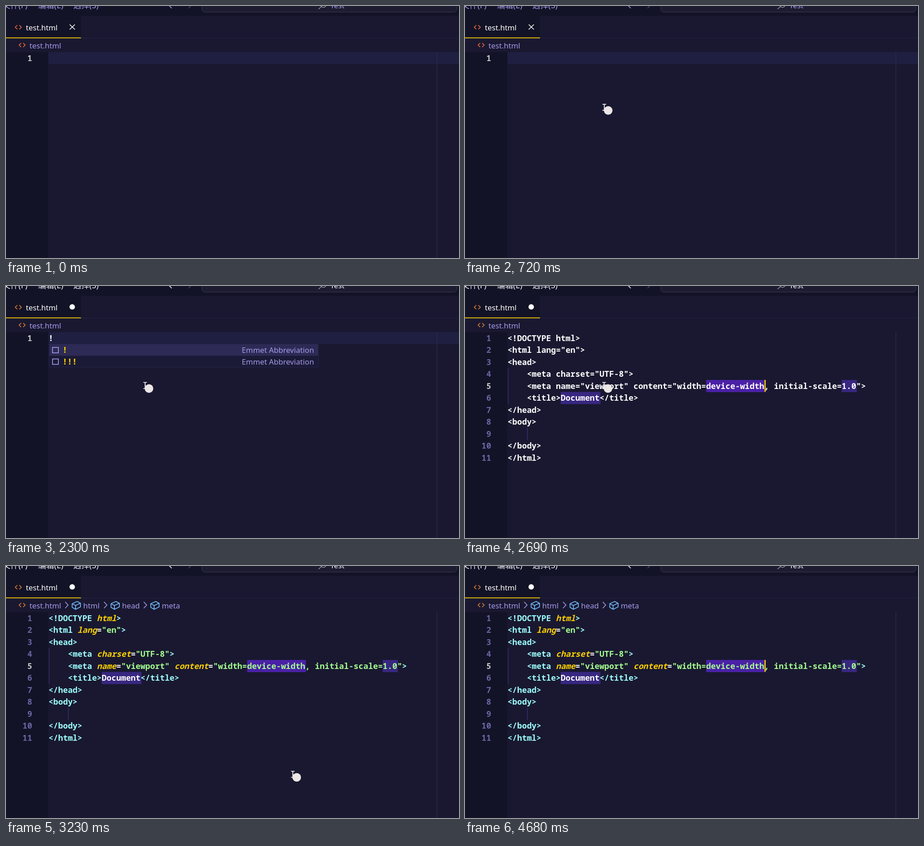
Recreate the animation shown at these times as an HTML page. Size 1003 px wide and 558 px high, loop 5.15 s.

```html
<!DOCTYPE html>
<html lang="en">
<head>
<meta charset="UTF-8">
<title>Editor</title>
<style>
html, body { margin: 0; width: 100%; height: 100%; overflow: hidden; background: #191830; }
svg { display: block; width: 1003px; height: 558px; }
text { white-space: pre; }
.ui { font: 16.7px "Noto Sans", "Noto Sans CJK SC", sans-serif; fill: #a599e9; }
.menu { font-size: 17.8px; }
.code { font: bold 17.89px "Noto Sans Mono", monospace; fill: #fff; }
.num { text-anchor: end; fill: #6c64a4; }
.num.now { fill: #c6c6c6; }
.line { fill: none; stroke-width: 1.7; }
.colored .tag { fill: #9effff; }
.colored .attr { fill: #fad000; font-style: italic; }
.colored .str { fill: #a5ff90; }
#top { fill: #a599e9; stroke: #a599e9; }
#top text { fill: inherit; stroke: none; }
#top.focus { fill: #f4f4fa; stroke: #f4f4fa; }
</style>
</head>
<body>
<svg viewBox="0 0 1003 558">
  <rect width="1003" height="558" fill="#191830"/>
  <rect width="1003" height="22" fill="#131327"/>
  <rect y="22" width="166" height="48" fill="#131327"/>
  <rect y="102" width="94" height="456" fill="#131327"/>
  <rect x="166" y="70" width="837" height="1.4" fill="#1f1f45"/>
  <rect y="69.6" width="166" height="1.8" fill="#fad000"/>

  <rect x="433.5" y="-20" width="565" height="33.5" rx="7" fill="#1d1c30" stroke="#3a394e"/>
  <g id="top">
    <text class="ui menu" x="-8" y="5">文件(F)</text>
    <text class="ui menu" x="71" y="5">编辑(E)</text>
    <text class="ui menu" x="149" y="5">选择(S)</text>
    <text class="ui" x="718" y="5">Test</text>
    <path class="line" d="M360-2L367 5"/>
  </g>
  <path class="line" stroke="#4a4768" d="M411-2L404 5"/>
  <path class="line" stroke="#96959f" d="M692 7L699 .5M697-3A6 6 0 0 0 709-3"/>

  <g id="icons" class="line">
    <path d="M25 42.5L20.5 47L25 51.5M29.500 42.5L34 47L29.500 51.5"/>
    <path d="M33.500 82L29 86.500L33.500 91M38 82L42.500 86.500L38 91"/>
  </g>
  <text class="ui" x="44" y="54" style="fill:#fff">test.html</text>
  <path id="close" class="line" stroke="#fff" d="M141 41L152.500 52M152.500 41L141 52"/>
  <circle id="dirty" cx="146.600" cy="46.300" r="6" fill="#fff"/>
  <text class="ui" x="52" y="93.500">test.html</text>
  <g id="crumbs"></g>

  <rect id="current" x="94" y="102" width="909" height="26.500" fill="#1f1f41"/>
  <rect x="953.300" y="102" width="1.700" height="456" fill="#29283f"/>
  <g id="first">
    <text class="code num now" x="58" y="121.700">1</text>
    <text id="bang" class="code" x="94" y="121.700">!</text>
  </g>
  <g id="doc">
    <rect x="534" y="208" width="130" height="27" fill="#4a21a6"/>
    <rect x="834" y="208" width="33.500" height="27" fill="#382780"/>
    <rect x="212" y="234.500" width="88" height="27" fill="#382780"/>
    <path d="M95.500 181.500V261M138 314V340.500" stroke="#3a2b72" stroke-width="1.500"/>
  </g>
  <g id="popup">
    <rect x="95" y="128.500" width="597" height="51.500" fill="#1b1a36" stroke="#25244a"/>
    <rect x="96" y="129" width="595" height="25.500" fill="#2d2b55"/>
  </g>
  <rect id="caret" width="2.600" height="26.500" fill="#fad000"/>
  <g id="mouse">
    <path class="line" stroke="#fff" d="M-4-6.500H4M0-6.500V7M-4 7H4"/>
    <ellipse cx="8.600" cy="7" rx="9.500" ry="9.500" fill="#ece6e6"/>
  </g>
</svg>
<script>
const LOOP = 5150, X0 = 94, ADV = 10.735, ROW = 26.5;
const FOCUS = 850, TYPE = 1790, SUGGEST = 1830, EXPAND = 2690, COLOR = 2720, CRUMBS = 3200;
const $ = id => document.getElementById(id);
const show = (id, on) => { $(id).style.display = on ? '' : 'none'; };

function add(parent, tag, attrs, text) {
  const el = document.createElementNS('http://www.w3.org/2000/svg', tag);
  for (const k in attrs) el.setAttribute(k, attrs[k]);
  if (text !== undefined) el.textContent = text;
  return parent.appendChild(el);
}

const SOURCE = [
  '<!DOCTYPE html>', '<html lang="en">', '<head>',
  '    <meta charset="UTF-8">',
  '    <meta name="viewport" content="width=device-width, initial-scale=1.0">',
  '    <title>Document</title>',
  '</head>', '<body>', '', '</body>', '</html>'
];
const TOKENS = /("[^"]*"|[a-z]+(?==")|(?<= )html(?=>)|=|Document)/;

function kind(token, isMatch) {
  if (!isMatch) return 'tag';
  if (token[0] === '"') return 'str';
  return token === '=' || token === 'Document' ? 'plain' : 'attr';
}

SOURCE.forEach((src, i) => {
  const y = 121.7 + i * ROW, code = src.trimStart();
  add($('doc'), 'text', { class: 'code num' + (i === 4 ? ' now' : ''), x: 58, y }, i + 1);
  const line = add($('doc'), 'text', { class: 'code', x: X0 + (src.length - code.length) * ADV, y });
  code.split(TOKENS).forEach((s, j) => {
    if (s) add(line, 'tspan', { class: kind(s, j % 2) }, s);
  });
});

[['html', 171], ['head', 257], ['meta', 345]].forEach(([name, x]) => {
  const g = $('crumbs'), c = x - 15.5;
  add(g, 'path', { class: 'line', stroke: '#a599e9', d: `M${x - 40} 79.500l6.500 7l-6.500 7` });
  add(g, 'path', {
    class: 'line', stroke: '#75beff', 'stroke-linejoin': 'round',
    d: `M${c - 9} 83.500l11-5l7.500 4v8l-11 5.500l-7.500-4.500zl7.500 4l10.500-5M${c - 1.5} 87.500v8`
  });
  add(g, 'text', { class: 'ui', x, y: 93.5 }, name);
});

['!', '!!!'].forEach((label, i) => {
  const g = $('popup'), y = 148 + i * 25.5;
  add(g, 'rect', { class: 'line', stroke: '#a599e9', x: 103, y: y - 12, width: 13, height: 12 });
  add(g, 'text', { class: 'code', x: 125, y, style: 'fill:#fad000' }, label);
  add(g, 'text', { class: 'ui', x: 682, y, 'text-anchor': 'end' }, 'Emmet Abbreviation');
});

// time, column, row, visible
const CARET = [
  [0, 0, 0, 0], [850, 0, 0, 1], [1320, 0, 0, 0], [1790, 1, 0, 1], [2300, 1, 0, 0],
  [2690, 53, 4, 1], [3230, 53, 4, 0], [3700, 53, 4, 1], [4180, 53, 4, 0], [4680, 53, 4, 1]
];
// moments at which the pointer is redrawn
const TICKS = [0, 340, 390, 420, 470, 520, 570, 620, 670, 720, 770,
  2970, 3000, 3050, 3100, 3150, 3200, 3250, 3300, 3350, 3380];

function pointer(t) {
  if (t < 2970) {
    const r = (1 - Math.min(1, (t - 340) / 430)) ** 2;
    return [308 + 32 * r, 220 + 308 * r];
  }
  const p = (t - 2940) / 410;
  return [308 + 565 * p ** 1.2, 220 + 330 * p ** 0.69];
}

function render(t) {
  const open = t >= EXPAND;
  $('top').classList.toggle('focus', t >= FOCUS);
  $('top').querySelectorAll('text').forEach(el => { el.style.fill = t >= FOCUS ? '#f4f4fa' : '#a599e9'; });
  $('icons').style.stroke = t >= FOCUS ? '#e07b35' : '#ee6a3c';
  show('close', t < TYPE);
  show('dirty', t >= TYPE);
  show('current', !open);
  show('first', !open);
  show('bang', t >= TYPE);
  show('popup', t >= SUGGEST && !open);
  show('doc', open);
  $('doc').classList.toggle('colored', t >= COLOR);
  show('crumbs', t >= CRUMBS);

  const [, col, row, on] = CARET.findLast(c => c[0] <= t);
  show('caret', on);
  $('caret').setAttribute('x', X0 + col * ADV + 0.2);
  $('caret').setAttribute('y', 102 + row * ROW);

  const moving = t >= 340 && t < 3380;
  show('mouse', moving);
  if (moving) $('mouse').setAttribute('transform', `translate(${pointer(TICKS.findLast(k => k <= t))})`);
}

const start = performance.now();
function loop() {
  render((performance.now() - start) % LOOP);
  requestAnimationFrame(loop);
}
loop();
</script>
</body>
</html>
```
